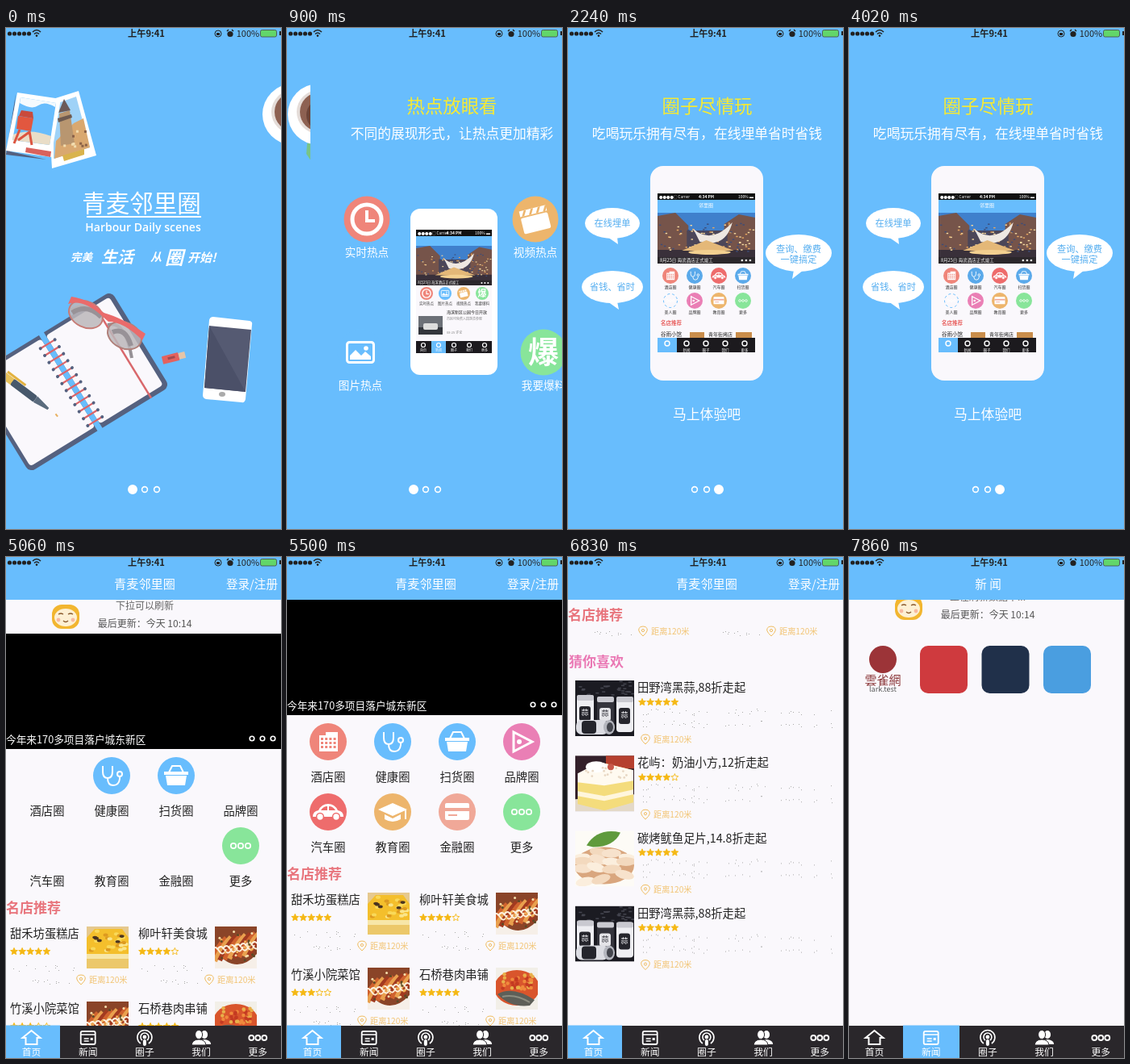
Write an HTML page that moves like this. It is 341 px wide and 621 px high and loops after 8000 ms.

```html
<!DOCTYPE html>
<html lang="zh">
<head>
<meta charset="utf-8">
<style>
html, body { margin: 0; width: 100%; height: 100%; overflow: hidden; background: #68bdfd; }
svg { display: block; }
text { font-family: "Noto Sans CJK SC", "Noto Sans CJK", sans-serif; }
</style>
</head>
<body>
<svg id="stage" width="341" height="621" viewBox="0 0 341 621"></svg>
<script>
const SKY = '#68bdfd', PAPER = '#faf8fc', INK = '#222', GOLD = '#f5b814', NAVY = '#55617f';
const RED = '#ef857a', AMBER = '#edb56c', GREEN = '#88e59a', PINK = '#ea7fb5';
const LOOP = 8000, STEP = LOOP / 54, PAGE = 349;

// Drawing helpers
const R = (x, y, w, h, fill, r = 0, more = '') =>
  `<rect x="${x}" y="${y}" width="${w}" height="${h}" rx="${r}" fill="${fill}" ${more}/>`;
const E = (x, y, rx, ry, fill, more = '') =>
  `<ellipse cx="${x}" cy="${y}" rx="${rx}" ry="${ry}" fill="${fill}" ${more}/>`;
const C = (x, y, r, fill, more) => E(x, y, r, r, fill, more);
const ring = (x, y, r, color, w = 1.8) => C(x, y, r, 'none', `stroke="${color}" stroke-width="${w}"`);
const P = (d, fill = 'none', stroke = 'none', w = 1) =>
  `<path d="${d}" fill="${fill}" stroke="${stroke}" stroke-width="${w}"/>`;
const T = (x, y, s, size, fill = '#fff', anchor = 'middle', more = '') =>
  `<text x="${x}" y="${y + size * .37}" font-size="${size}" fill="${fill}" text-anchor="${anchor}" ${more}>${s}</text>`;
const L = (x, y, s, size, fill, more) => T(x, y, s, size, fill, 'start', more);
const G = (x, y, body, more = '') => `<g transform="translate(${x} ${y}) ${more}">${body}</g>`;
const layer = (id, body) => `<g id="${id}">${body}</g>`;
const box = (x, y, w, h, vw, vh, body) =>
  `<svg x="${x}" y="${y}" width="${w}" height="${h}" viewBox="0 0 ${vw} ${vh}" preserveAspectRatio="none">${body}</svg>`;
const many = (n, f) => Array.from({ length: n }, (_, i) => f(i)).join('');
const rand = i => { const v = Math.sin(i * 127.1 + 3) * 43758.5; return v - Math.floor(v); };
const bold = 'font-weight="700"';

// White symbols, centred on 0,0
const glyphs = {
  hotel: P('M-11 12V-8H-3V-12H12V12Z', '#fff') +
    many(12, i => R(-9 + i % 4 * 5.2, -5 + Math.floor(i / 4) * 5, 3, 3, RED)),
  health: P('M-11-12v7q0 8 6 8t6-8v-7M-5 3q0 9 7 9t8-8v-3', 'none', '#fff', 2) + ring(10, -2, 3, '#fff', 2),
  shop: P('M-15-5H15V-1H-15ZM-13 0H13L11 12H-11Z', '#fff') + P('M-9-4l4-8h10l4 8', 'none', '#fff', 2),
  brand: P('M-10-12L13 0-10 12Z', 'none', '#fff', 3) + C(-3, 0, 3, '#fff'),
  car: P('M-19 6Q-19-1-12-2Q-8-10 0-10T12-2Q19-1 19 6Z', '#fff') +
    P('M-9-2Q-6-7-1-7V-2ZM1-2V-7Q6-7 9-2Z', '#ee6c6c') +
    many(2, i => C(i * 20 - 10, 6, 4.4, '#fff', 'stroke="#ee6c6c" stroke-width="1.5"')),
  school: P('M0-11L18-3 0 5-18-3ZM-10 3v6q10 6 20 0V3L0 8ZM15-2h2V9h-2Z', '#fff'),
  money: R(-15, -11, 30, 21, '#fff', 2) + R(-15, -5, 30, 4, '#f0a898') + R(-11, 3, 11, 2, '#f0a898'),
  more: many(3, i => ring(i * 9 - 9, 0, 3.2, '#fff', 1.7)),
  clock: ring(0, 0, 18, '#fff', 5) + P('M0-11V2H10', 'none', '#fff', 4),
  film: G(0, 2, R(-17, -7, 34, 20, '#fff', 2) + R(-17, -16, 34, 7, '#fff') +
    many(4, i => P(`M${i * 9 - 15}-9l4-7h3l-4 7z`, AMBER)), 'rotate(-14)'),
  image: R(-16.5, -12.5, 33, 25, 'none', 3, 'stroke="#fff" stroke-width="3"') +
    P('M-13 9V4l7-7 7 7 5-5 7 6v4z', '#fff') + C(7, -5, 2.8, '#fff'),
  burst: T(0, -1, '爆', 38, '#fff', 'middle', bold)
};
const badge = (x, y, r, color, name, native = 23) =>
  G(x, y, C(0, 0, r, color) + G(0, 0, glyphs[name], `scale(${r / native})`));

const circles = [
  ['酒店圈', RED, 'hotel'], ['健康圈', SKY, 'health'], ['扫货圈', SKY, 'shop'], ['品牌圈', PINK, 'brand'],
  ['汽车圈', '#ee6c6c', 'car'], ['教育圈', AMBER, 'school'], ['金融圈', '#f0a898', 'money'], ['更多', GREEN, 'more']
];
const hot = [['实时热点', RED, 'clock'], ['图片热点', SKY, 'image'], ['视频热点', AMBER, 'film'], ['我要爆料', GREEN, 'burst']];

const hotel = (x, y, w, h, caption) => box(x, y, w, h, 120, 63,
  R(0, 0, 120, 63, '#3f80cc') + P('M0 4L22 0 38 16V50H0ZM120 6L100 2 82 14V50H120Z', '#76544a') +
  P('M36 22H86V50H36Z', '#4c4658') + R(0, 46, 120, 17, '#39303a') +
  many(90, i => R(rand(i) * 118, 12 + rand(i + 99) * 36, 2.4, 1.4, ['#e8a860', '#3c4c78', '#f4d9a0'][i % 3])) +
  P('M44 20Q66 40 92 12Q84 44 52 36Z', '#eee8e2') + P('M30 47L60 34 94 47Z', '#e4b878') +
  E(64, 49, 26, 3, '#f3d090') + R(0, 55, 120, 8, '#222', 0, 'opacity=".6"') +
  L(3, 59, caption, 5.5, '#fff') + many(3, i => C(104 + i * 5, 59, 1.3, '#fff')));

// First intro page
const spiral = many(12, i => G(0, -124 + i * 10.2,
  P('M-111 0H-92', 'none', '#dc6468', 2.2) + C(-112, 0, 2, NAVY) + C(-91, 0, 2, NAVY)));
const notebook = G(203, 444.5,
  R(-204, -139, 204, 139, NAVY, 8) + R(-199, -134, 94, 128, PAPER, 4) + R(-98, -134, 92, 128, PAPER, 4) +
  R(-105, -140, 7, 141, SKY) + P('M-27-134V0', 'none', '#d9686c', 2.5) + spiral, 'rotate(-31.5)');
const lens = (x, y, rim) =>
  E(x, y, 22, 16, '#bdb8bb', `opacity=".85" transform="rotate(26 ${x} ${y})"`) +
  E(x, y, 22, 16, 'none', `stroke="${rim}" stroke-width="2" transform="rotate(26 ${x} ${y})"`);
const glasses =
  P('M80 350Q100 338 122 356M126 368Q148 362 156 409', 'none', '#969196', 4) +
  lens(99, 355, '#c77c76') + lens(147, 381, '#b0807a') +
  P('M82 353Q100 341 118 358M132 377Q148 370 155 394', 'none', '#989297', 6) +
  P('M77 342L81 333Q104 336 121 353Q144 359 173 379L169 387Q146 364 127 364L119 357Q98 338 81 341Z', '#ea6b6b');
const pen = G(0, 432,
  R(-8, -4, 22, 9, '#e8c15a', 3) + R(10, -4, 36, 9, '#47586b', 2) + P('M46-4L66-1V2L46 5Z', '#5a6b7d') +
  P('M-2-6H26', 'none', '#e3b23f', 3) + P('M77 0l4 1', 'none', '#e8b060', 2), 'rotate(37)');
const polaroids =
  P('M52 90L90 78 112 158 57 174Z', '#fff') + P('M59 95L87 85 104 148 59 162Z', '#9fd2f7') +
  P('M84 118L96 112 104 148 60 162 62 140Z', '#d9a870') + P('M66 106L79 102 85 143 68 146Z', '#b89670') +
  P('M65 105L72 88 80 102Z', '#6b5a58') + P('M64 112L81 107 82 111 65 117Z', '#6d5a50') +
  many(10, i => R(64 + rand(i) * 36, 124 + rand(i + 20) * 24, 3, 3, i % 2 ? '#8a6148' : '#f2dcae')) +
  P('M70 158L97 150V157L72 165Z', '#d9b34c') +
  P('M12 82L5 153 50 163 0 157Z', NAVY) + P('M14 80L68 88 56 160 0 152Z', '#fff') +
  P('M18 86L62 93 54 145 8 139Z', '#68bdfd') + P('M18 86L62 93 61 98Q48 90 40 96T17 93Z', '#f4fafe') +
  P('M9 132Q30 124 56 134L54 145 8 139Z', '#e9ddc7') + P('M15 109L34 112 31 128 13 125Z', '#e2573f') +
  P('M17 126L10 143M29 128L32 145M15 139L29 129', 'none', '#dc5540', 3) + P('M19 102L33 104 34 112 16 109Z', '#c94a3c') +
  P('M25 148L56 153 55 160 24 154Z', '#d9625c');
const phone =
  P('M257 358L302 363Q306 364 305 368L297 460Q296 465 292 464L248 460Q244 459 244 455L252 362Q253 358 257 358Z', '#fff') +
  P('M252 369L304 374 297 451 246 446Z', '#555a72') + P('M252 369L297 451 246 446Z', '#4b5068') +
  E(268, 454, 4, 3, '#aaa');
const coffee = P('M342 143H347V165L341 156Z', '#78c487') + C(356, 107, 38, '#fff') +
  C(356, 104, 27, '#e4dcd8') + C(357, 104, 24, '#8d6152') + C(361, 108, 20, '#6c4438');
const brush = (x, s, size) => L(x, 284, s, size, '#fff', `font-style="italic" ${bold}`);
const page1 = polaroids + coffee +
  T(168, 217, '青麦邻里圈', 29.5) + P('M100 234H242', 'none', '#fff', 2) +
  T(170, 247, 'Harbour Daily scenes', 14, '#fff', 'middle', 'font-weight="600" style="font-family:\'Open Sans\',sans-serif"') +
  brush(80, '完美', 13.5) + brush(118, '生活', 20) + brush(179, '从', 14) + brush(197, '圈', 23) + brush(225, '开始!', 15) +
  notebook + glasses + pen + phone +
  G(194, 412, R(0, -5, 21, 10, '#e3625f', 1) + R(21, -4, 8, 8, '#e5c5a8') + R(7, -2, 9, 3, '#a04a50'), 'rotate(-14)');

// Other intro pages
const heading = (title, line) => R(-3, 0, PAGE, 621, SKY) + T(172.5, 97, title, 22.4, '#f8ea30') + T(172.5, 131, line, 16.8);
const miniStatus = (x, y, w, h) => R(x, y, w, h, '#111') + L(x + 2, y + h / 2, '●●●●○ Carrier', 4.5) +
  T(x + w / 2, y + h / 2, '4:34 PM', 5, '#fff', 'middle', bold) + T(x + w - 2, y + h / 2, '100% ▬', 5, '#fff', 'end');
const page2 = heading('热点放眼看', '不同的展现形式，让热点更加精彩') +
  R(121, 224, 108, 206, '#fff', 12) + R(128, 250, 94, 153, PAPER) + miniStatus(128, 250, 94, 8) + R(128, 258, 94, 12, SKY) +
  hotel(128, 270, 94, 49, '8月25日 海滨酒店正式竣工') +
  hot.map(([s, c, g], i) =>
    badge(141 + i * 23, 329, 8, c, g, 28) + T(141 + i * 23, 341, s, 4.5, '#444')).join('') +
  L(166, 352, '海滨新区公园今日开放', 5, INK) + R(131, 357, 30, 23, '#6c7077') + R(131, 371, 30, 9, '#33363c') +
  R(137, 366, 18, 8, '#ddd', 2) + L(166, 361, '市民可免费入园游览参观', 4, '#888') + L(166, 378, '08-25  评论', 4, '#888') +
  R(128, 388, 94, 15, '#1c1a1e') + R(147, 388, 18, 15, SKY) +
  many(5, i => ring(137 + i * 19, 393, 2.5, '#fff', 1.2) + T(137 + i * 19, 400, ['首页', '新闻', '圈子', '我们', '更多'][i], 4)) +
  hot.map(([s, c, g], i) => {
    const x = [67, 59, 276, 286][i], y = i % 2 ? 402 : 237;
    return badge(x, y, 28.5, c, g, 28.5) + T(x, y + 41, s, 13.6);
  }).join('');

const bubble = (x, y, rx, ry, tx, ty, lines) => E(x, y, rx, ry, '#fff') +
  P(`M${x - 6} ${y + ry - 2}L${tx} ${ty}L${x + 6} ${y + ry - 2}Z`, '#fff') +
  lines.map((s, i) => T(x, y + i * 13 - (lines.length - 1) * 5, s, 11.2, '#55aef0')).join('');
const page3 = heading('圈子尽情玩', '吃喝玩乐拥有尽有，在线埋单省时省钱') +
  R(102, 171, 140, 266, PAPER, 16) + miniStatus(111, 205, 121, 8) + R(111, 213, 121, 16, SKY) + T(171, 220, '邻里圈', 6) +
  hotel(111, 229, 121, 63, '8月25日 海滨酒店正式竣工') +
  circles.map(([s], i) => {
    const look = [[RED, 'hotel'], ['#5aa9ea', 'health'], ['#ee6c6c', 'car'], ['#5aa9ea', 'shop'],
      [PAPER, 'more'], [PINK, 'brand'], [AMBER, 'money'], [GREEN, 'more']][i];
    const x = 127 + i % 4 * 30, y = i < 4 ? 307 : 338;
    return badge(x, y, 10, ...look) +
      (i === 4 ? C(x, y, 8.5, 'none', `stroke="${SKY}" stroke-dasharray="3 3"`) : '') +
      T(x, y + 14, ['酒店圈', '健康圈', '汽车圈', '扫货圈', '美人圈', '品牌圈', '教育圈', '更多'][i], 5, '#333');
  }).join('') +
  L(115, 366, '名店推荐', 6.5, '#e8605f', bold) + L(115, 380, '谷雨小馆', 6.5, INK) + L(174, 380, '青年街烤店', 6, INK) +
  R(151, 377, 18, 7, '#c98d4b') + R(208, 377, 20, 7, '#c98d4b') +
  R(111, 384, 121, 18, '#1c1a1e') + R(111, 384, 24, 18, SKY) +
  many(5, i => ring(123 + i * 24, 391, 3, '#fff', 1.4) + (i ? T(123 + i * 24, 399, ['', '新闻', '圈子', '我们', '更多'][i], 4.5) : '')) +
  bubble(55, 242, 34, 19, 62, 268, ['在线埋单']) + bubble(55, 321, 38, 20, 63, 349, ['省钱、省时']) +
  bubble(286, 279, 41, 23, 278, 311, ['查询、缴费', '一键搞定']) + T(172, 479, '马上体验吧', 16.8);

// App content
const star = (x, y, full) => {
  const pts = many(10, i => {
    const a = i * Math.PI / 5 - Math.PI / 2, r = i % 2 ? 2.1 : 4.6;
    return `${i ? 'L' : 'M'}${(x + r * Math.cos(a)).toFixed(1)} ${(y + r * Math.sin(a)).toFixed(1)}`;
  });
  return P(pts + 'Z', full ? GOLD : 'none', GOLD, .9);
};
const stars = (x, y, n) => many(5, i => star(x + i * 10.1, y, i < n));
const place = (x, y) => P(`M${x} ${y + 6}q-9-8-3-11.500q3-1 6 0q6 3.500-3 11.500z`, 'none', '#f0bd62', 1) +
  ring(x, y - 1, 1.6, '#f0bd62', 1) + L(x + 10, y, '距离120米', 10.2, '#f2c473');
// Washed-out description line: only sparse specks remain
const specks = (x, y, w) => many(Math.round(w / 7), i =>
  R(x + Math.floor(rand(i + y) * w), y + Math.floor(rand(i + y + 60) * 9) - 4, 1, 1, '#aaa'));

const dishes = {
  cake: R(0, 0, 52, 52, '#e6c98e') + P('M0 14L10 3H44L52 14V36H0Z', '#f4bf2c') + R(0, 34, 52, 6, '#f7e6a8') + R(0, 40, 52, 12, '#ecc86a') +
    many(26, i => E(3 + rand(i) * 46, 5 + rand(i + 40) * 27, 3, 2, ['#f9d95a', '#dd9a20', '#fae58a'][i % 3])) +
    many(5, i => E(8 + rand(i + 11) * 36, 6 + rand(i + 80) * 16, 3, 1.8, '#4a3420')),
  ribs: R(0, 0, 52, 52, '#8a4428') + P('M0 30Q26 62 52 34V52H0Z', '#f6efe8') +
    many(9, i => P(`M${i * 6 - 6} ${44 - i}q8-18 20-30`, 'none', ['#d0622e', '#e9a04e', '#a23a20'][i % 3], 6)) +
    many(8, i => P(`M${i * 7 - 4} ${30 - i}q4-8 9 0t9-2`, 'none', '#fdf0dc', 1.8)) +
    many(26, i => C(3 + rand(i + 7) * 46, 6 + rand(i + 70) * 36, 1.5, ['#f7dfac', '#5a4a26', '#f2b45a'][i % 3])),
  fish: R(0, 0, 52, 52, '#f2efe8') + E(26, 25, 28, 22, '#d9552c') + P('M2 33Q20 22 48 40L42 47Q18 50 2 33Z', '#5d5f58') +
    P('M8 36Q24 32 42 43', 'none', '#8c8d80', 2) +
    many(40, i => C(6 + rand(i + 3) * 40, 8 + rand(i + 50) * 20, 2.2, ['#f08a3c', '#c43a22', '#e8b04a'][i % 3]))
};
const jar = (x, y, h, body, label) => R(x, y, 21, h, body, 4) + R(x, y, 21, 7, '#c9c9d0', 2) +
  R(x + 3, y + 14, 14, h - 24, label, 3) + T(x + 10, y + h / 2 + 1, '蒜', 9, body);
const goods = {
  garlic: R(0, 0, 73, 69, '#1b1b22') + many(30, i => R(rand(i) * 70, rand(i + 30) * 18, 4, 1.5, '#44454f')) +
    jar(2, 18, 42, '#eeeef2', '#25252c') + jar(27, 20, 40, '#34343c', '#e4e4e8') + jar(51, 20, 44, '#eeeef2', '#25252c') +
    R(1, 49, 40, 18, '#dcdde3', 7) + R(8, 50, 18, 16, '#24252c', 4) + E(42, 58, 7, 9, '#b4b6be') + E(43, 58, 4, 6, '#44464e'),
  cream: R(0, 0, 73, 69, '#33202a') + R(38, 0, 35, 16, '#b5402f') + P('M0 54L73 48V69H0Z', '#e4d9c8') +
    P('M3 24L30 8 72 18V58L36 68 3 60Z', '#f4dc7c') + P('M3 22L30 8 72 18V31L36 37 3 33Z', '#fffaf0') +
    P('M3 44L36 50 72 42V48L36 56 3 50Z', '#fff6dc') + E(26, 14, 13, 7, '#fff') + C(44, 14, 4, '#c8584a') +
    many(16, i => C(10 + rand(i) * 54, 14 + rand(i + 25) * 14, 1.4, '#e8d8c4')),
  squid: R(0, 0, 73, 69, '#fdfbf6') + P('M14 18Q28-4 56 2Q48 20 22 20Z', '#5f9a3c') + E(36, 43, 37, 23, '#d9a67e') +
    many(14, i => E(9 + i % 4 * 18, 28 + Math.floor(i / 4) * 10, 12, 5.5, ['#fbeedd', '#f3d9be', '#f7e2cc'][i % 3],
      `transform="rotate(${rand(i) * 40 - 20} 36 43)"`))
};
const shop = ([name, n, dish], i) => G(i % 2 * 159, i < 2 ? 0 : 93,
  L(5, 425, name, 14.3, INK) + stars(10, 447, n) + box(100, 416, 52, 52, 52, 52, dishes[dish]) +
  specks(5, 468, 85) + specks(5, 484, 75) + place(93, 482));
const deal = ([name, n, pic], i) => G(0, i * 93.2,
  box(9, 636, 73, 69, 73, 69, goods[pic]) + L(86, 645, name, 14.3, INK) + stars(92, 663, n) +
  specks(88, 675, 240) + specks(88, 690, 240) + place(96, 709));
const circleItem = ([s, c, g], i) => {
  const x = 51 + i % 4 * 80, y = i < 4 ? 229 : 316, early = [1, 2, 7].includes(i);
  return `<g class="${early ? '' : 'late'}">${badge(x, y, 23, c, g)}</g>` + T(x, y + 44, s, 14.3, INK);
};
const refresh = label => G(74, 32, R(-17, -15, 34, 30, '#f2b630', 12) + E(0, 1, 14, 11, '#fdf0d4') +
    P('M-9-3q3-2 6 0M3-3q3-2 6 0M-3 5q3 3 6 0', 'none', '#8a5a2c', 1.3) + C(-9, 4, 2.4, '#f7b9a0') + C(9, 4, 2.4, '#f7b9a0')) +
  `<text id="${label}" x="172" y="22.500" font-size="12" fill="#666" text-anchor="middle">正在刷新数据中...</text>` +
  T(172, 41, '最后更新：今天 10:14', 12, '#555', 'middle', 'font-weight="500"');

const home = layer('scroll', refresh('hint') + R(0, 53, 341, 143, '#000') + L(0, 184, '今年来170多项目落户城东新区', 12.7) +
    many(3, i => ring(305 + i * 13, 183, 2.8, '#fff', 1.6)) + circles.map(circleItem).join('') +
    [['甜禾坊蛋糕店', 5, 'cake'], ['柳叶轩美食城', 4, 'ribs'], ['竹溪小院菜馆', 3, 'ribs'], ['石桥巷肉串铺', 5, 'fish']].map(shop).join('') +
    L(1, 613, '猜你喜欢', 17, '#ea78b4', bold) +
    [['田野湾黑蒜,88折走起', 5, 'garlic'], ['花屿：奶油小方,12折走起', 4, 'cream'],
      ['碳烤鱿鱼足片,14.8折走起', 5, 'squid'], ['田野湾黑蒜,88折走起', 5, 'garlic']].map(deal).join('')) +
  layer('sticky', R(0, -19, 341, 31, PAPER) + L(0, 0, '名店推荐', 17, '#e8747c', bold));
const news = layer('feed', refresh('newsHint') + C(42, 96, 17, '#9c3438') +
  T(42, 121, '雲雀網', 15, '#8d3a3c') + T(42, 133, 'lark.test', 9, '#555') +
  ['#cf3a3e', '#20304a', '#4a9ee0'].map((c, i) => R(88 + i * 76.5, 79, 59, 59, c, 10)).join(''));

const tabIcons = [
  P('M-11 0L0-9 11 0H7V8H-7V0Z', 'none', '#fff', 2),
  R(-9, -8, 18, 16, 'none', 2, 'stroke="#fff" stroke-width="1.800"') + P('M-9-4H9M-5 1H1M-5 4H1', 'none', '#fff', 1.5) + R(3, 0, 3, 3, '#fff'),
  P('M-5 7A9 9 0 1 1 5 7M-3 3A5 5 0 1 1 3 3', 'none', '#fff', 1.6) + C(0, -1, 2.4, '#fff') + R(-2, 2, 4, 8, '#fff', 2),
  E(4, -4, 4, 5, '#fff') + P('M-2 8Q-2 3 4 2Q12 3 12 8Z', '#fff') + E(-3, -4, 4.5, 5.5, '#fff', 'stroke="#2a272b"') + P('M-12 9Q-11 2-3 2Q5 2 6 9Z', '#fff', '#2a272b'),
  many(3, i => ring(i * 8 - 8, 0, 3, '#fff', 1.8))
];
const tabs = R(0, 581, 341, 40, '#2a272b') + R(0, 580.5, 70, 41, SKY, 0, 'id="active"') +
  tabIcons.map((g, i) => G(31.5 + i * 70.2, 596, g) + T(31.5 + i * 70.2, 614, ['首页', '新闻', '圈子', '我们', '更多'][i], 11.8)).join('');

const status = many(5, i => C(4.5 + i * 6, 7, 2.6, INK)) +
  P('M33 5Q38 0 43 5M35 7.500Q38 4.500 41 7.500', 'none', INK, 1.6) + C(38, 9.6, 1.3, INK) +
  T(174, 7, '上午9:41', 11.2, INK, 'middle', bold) +
  ring(263, 7, 4, INK, 1) + R(261, 6, 4, 3, INK) + C(278, 7.5, 3.6, INK) + P('M274 4l2-2M282 4l-2-2', 'none', INK, 1.5) +
  T(300, 7, '100%', 11, INK) + R(315.5, 2.5, 20, 8.5, '#62d66a', 2, 'stroke="#444" stroke-width=".8"') + R(339, 4, 2, 5, INK);

const $ = id => document.getElementById(id);
$('stage').innerHTML =
  layer('intro', R(0, 0, 341, 621, SKY) + [page1, page2, page3].map((p, i) => layer('page' + i, p)).join('') +
    many(3, i => `<circle id="dot${i}" cx="${157 + i * 15}" cy="572" stroke="#fff" stroke-width="1.600"/>`)) +
  layer('app', R(0, 0, 341, 621, PAPER) + layer('home', home) + layer('news', news) + R(0, 0, 341, 53, SKY) +
    layer('homeBar', T(172, 33.5, '青麦邻里圈', 15.2) + T(337, 34, '登录/注册', 14.6, '#fff', 'end')) +
    layer('newsBar', T(172.500, 33.5, '新 闻', 14.6)) + tabs) + status;

const move = (id, x, y) => $(id).setAttribute('transform', `translate(${x} ${y})`);
const show = (id, on) => $(id).setAttribute('display', on ? 'inline' : 'none');
const part = (t, from, span) => Math.min(1, Math.max(0, (t - from) / span));
const swipe = (t, from, span) => 1 - (1 - part(t, from, span)) ** 3;
const ease = (t, from, span) => { const p = part(t, from, span); return p * p * (3 - 2 * p); };
const late = document.querySelectorAll('.late');

function draw(now) {
  const t = Math.floor(now % LOOP / STEP) * STEP;
  const inApp = t >= 4290, inNews = t >= 7540;
  show('intro', !inApp);
  show('app', inApp);

  const pos = swipe(t, 400, 890) + swipe(t, 1350, 800);
  const current = t < 1250 ? 0 : t < 2120 ? 1 : 2;
  for (let i = 0; i < 3; i++) {
    move('page' + i, Math.round((i - pos) * PAGE), 0);
    $('dot' + i).setAttribute('r', i === current ? 5.2 : 3.4);
    $('dot' + i).setAttribute('fill', i === current ? '#fff' : 'none');
  }

  const pull = 50 * (ease(t, 4290, 260) - ease(t, 4972, 260));
  const y = Math.round(pull - 483 * ease(t, 5604, 1156));
  move('scroll', 0, y);
  move('sticky', 0, Math.max(72, 393 + y));
  $('hint').textContent = t < 4960 ? '正在刷新数据中...' : '下拉可以刷新';
  late.forEach(g => g.setAttribute('display', t < 5300 ? 'none' : 'inline'));

  for (const id of ['home', 'homeBar']) show(id, !inNews);
  for (const id of ['news', 'newsBar']) show(id, inNews);
  move('feed', 0, Math.round(50 * ease(t, 7700, 260)));
  $('active').setAttribute('x', inNews ? 67 : -3);
  requestAnimationFrame(() => draw(performance.now()));
}
draw(performance.now());
</script>
</body>
</html>
```
